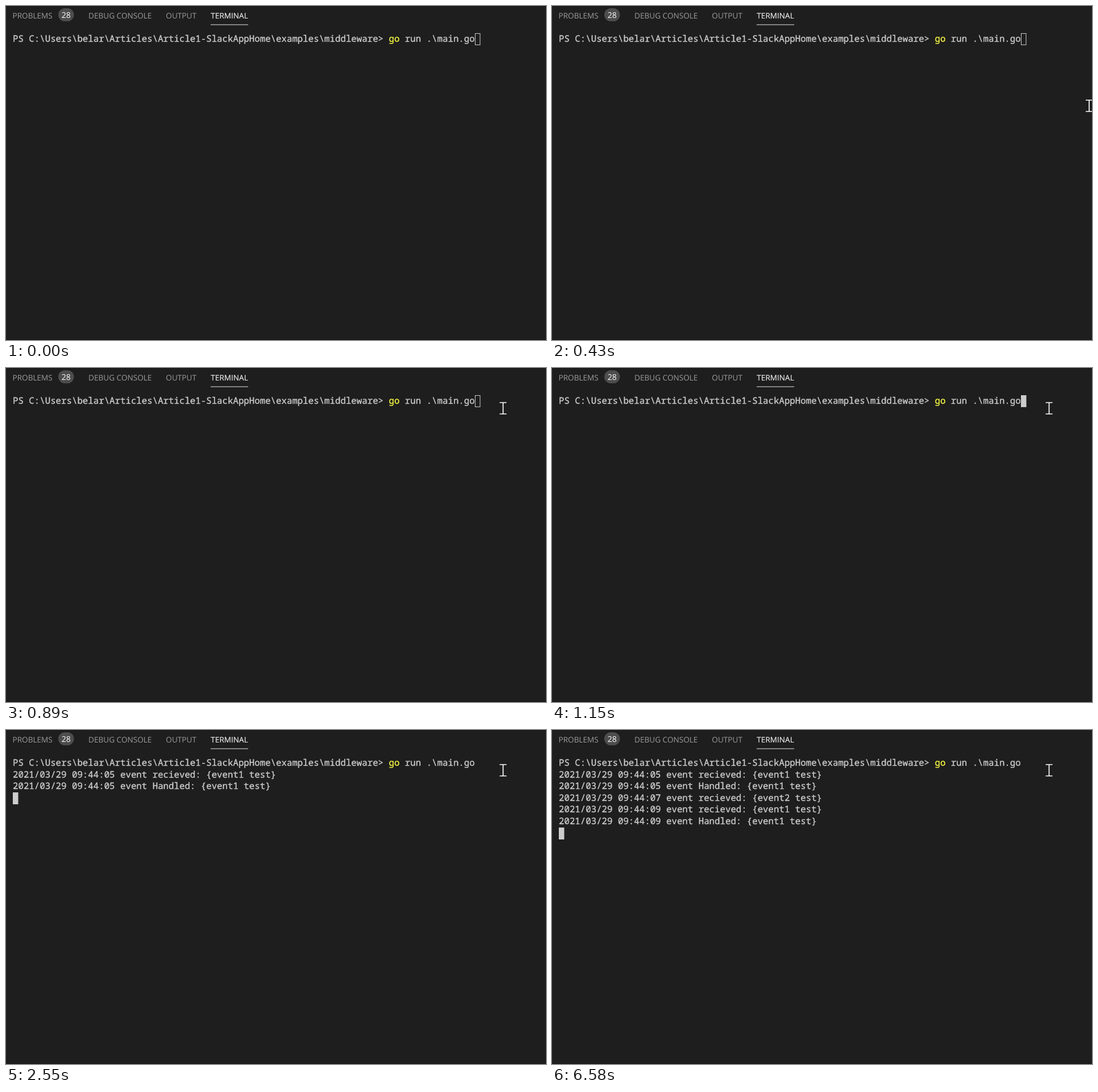
An HTML page that plays this animation: 950 by 589 pixels, repeating every 8000 ms.

```html
<!DOCTYPE html>
<html lang="en">
<head>
<meta charset="utf-8">
<title>Terminal</title>
<style>
  html, body { margin: 0; width: 100%; height: 100%; overflow: hidden; background: #1e1e1e; }
  svg { display: block; text-rendering: geometricPrecision; }
  .tabs { font: 13.6px "Open Sans", "Noto Sans", sans-serif; fill: #9b9b9b; }
  .tabs .active { fill: #e7e7e7; }
  .tabs text.active { stroke: #e7e7e7; stroke-width: .2; }
  .tabs .count { font-size: 14px; fill: #fff; text-anchor: middle; }
  .terminal { font: 15.755px "Noto Sans Mono", monospace; fill: #ccc; stroke: #ccc; stroke-width: .35; }
  .command { fill: #f5f543; stroke: #f5f543; }
</style>
</head>
<body>
<svg width="950" height="589" viewBox="0 0 950 589">
  <rect width="950" height="589" fill="#1e1e1e"/>
  <path d="M0 .5H950M0 588.5H950" stroke="#151515"/>
  <g class="tabs">
    <text x="11.5" y="21.5">PROBLEMS</text>
    <rect x="92" y="4" width="27.5" height="23" rx="11.5" fill="#4d4d4d"/>
    <text class="count" x="105.7" y="20.5">28</text>
    <text x="145" y="21.5">DEBUG CONSOLE</text>
    <text x="281.3" y="21.5">OUTPUT</text>
    <text class="active" x="360.3" y="21.5">TERMINAL</text>
    <rect class="active" x="360" y="32.5" width="66" height="1"/>
  </g>
  <g class="terminal" id="terminal">
    <text x="12" y="63">PS C:\Users\belar\Articles\Article1-SlackAppHome\examples\middleware&gt; <tspan class="command">go</tspan> run .\main.go</text>
  </g>
  <rect id="caret" stroke="#ccc"/>
  <circle id="click" cx="874" cy="71" r="13" fill="#ff0" fill-opacity=".47"/>
  <path id="pointer" d="M-6 -10H6M-6 10H6M0 -10V10" fill="none" stroke="#fff" stroke-width="1.7"/>
</svg>
<script>
  const LOOP = 8000, LINE = 20.6, ENTER = 2080;
  const byId = id => document.getElementById(id);
  const terminal = byId('terminal'), caret = byId('caret');
  const click = byId('click'), pointer = byId('pointer');

  const log = [
    [2550, '05 event recieved: {event1 test}'],
    [2550, '05 event Handled: {event1 test}'],
    [4560, '07 event recieved: {event2 test}'],
    [6580, '09 event recieved: {event1 test}'],
    [6580, '09 event Handled: {event1 test}']
  ].map(([time, message], i) => {
    const node = document.createElementNS(terminal.namespaceURI, 'text');
    node.textContent = '2021/03/29 09:44:' + message;
    node.setAttribute('x', 12);
    node.setAttribute('y', 63 + LINE * (i + 1));
    terminal.append(node);
    return { time, node };
  });

  const setAttributes = (node, values) => {
    for (const name in values) node.setAttribute(name, values[name]);
  };
  const show = (node, visible) => setAttributes(node, { visibility: visible ? 'visible' : 'hidden' });
  const easeOut = p => 1 - (1 - p) ** 2;
  const easeInOut = p => p * p * (3 - 2 * p);

  // Moves in discrete steps, as a sampled mouse pointer does.
  function glide(t, start, end, steps, from, to, ease) {
    const progress = Math.min(1, (t - start) / (end - start));
    const p = ease(Math.floor(progress * (steps - 1) + 1e-6) / (steps - 1));
    return from.map((v, i) => v + (to[i] - v) * p);
  }

  function drawPointer(t) {
    show(pointer, t >= 70);
    const [x, y] = t < 430
      ? glide(t, 70, 270, 4, [918, 565], [945, 179], easeOut)
      : glide(t, 430, 890, 7, [945, 176], [874.5, 71], easeInOut);
    pointer.setAttribute('transform', `translate(${x} ${y})`);
    show(click, t >= 1060 && t < 1150);
  }

  function drawTerminal(t) {
    let row = t < ENTER ? 0 : 1;
    for (const { time, node } of log) {
      show(node, t >= time);
      if (t >= time) row++;
    }
    setAttributes(caret, {
      x: row ? 12.5 : 825.5,
      y: Math.round(48 + LINE * row) + .5,
      width: 8.5, height: 20,
      fill: t < 1060 ? 'none' : '#ccc'
    });
  }

  function frame() {
    const t = performance.now() % LOOP;
    drawPointer(t);
    drawTerminal(t);
    requestAnimationFrame(frame);
  }
  frame();
</script>
</body>
</html>
```
